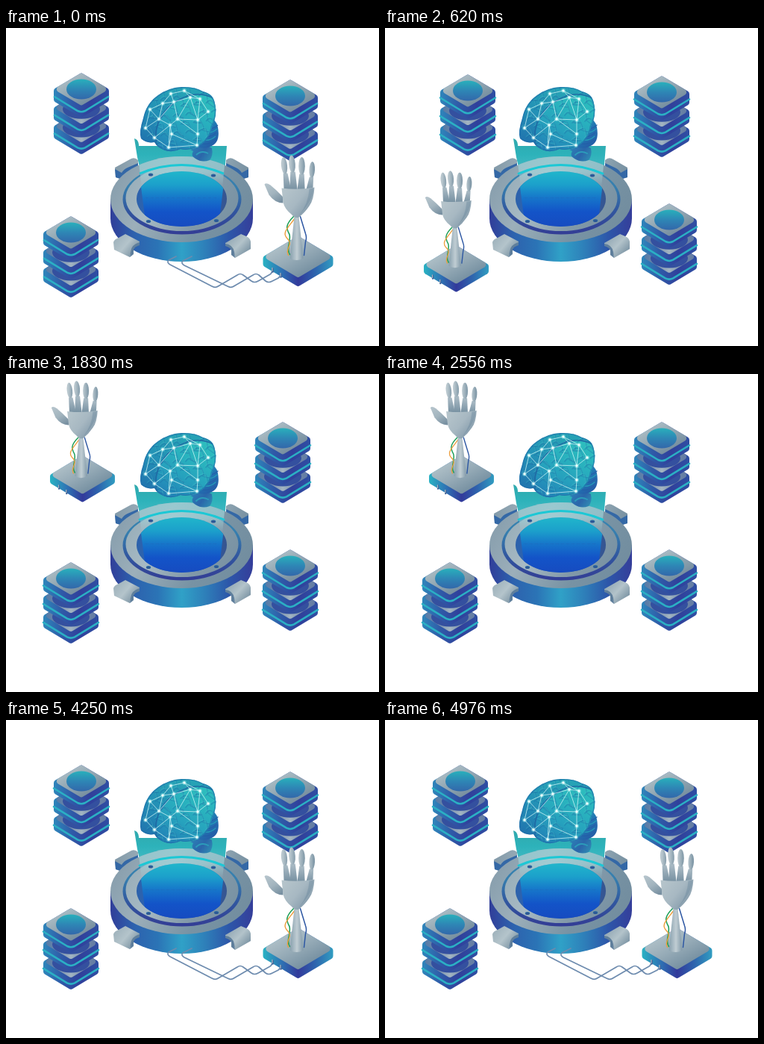
Write an HTML page with a canvas that moves like this. It is 500 by 426 pixels and loops after 5.46 s.

```html
<!DOCTYPE html>
<html lang="en">
<head>
<meta charset="utf-8">
<title>Brain platform</title>
<style>
html, body { margin: 0; width: 100%; height: 100%; overflow: hidden; background: #fff; }
canvas { display: block; width: 500px; height: 426px; }
</style>
</head>
<body>
<canvas id="stage" width="500" height="426"></canvas>
<script>
const ctx = document.getElementById('stage').getContext('2d');
const TAU = Math.PI * 2;

// Each scene: end time, server stacks [x, top], arm [x, bottom, scale]
const LAST = { stacks: [[101, 60], [381, 69], [87, 252]], arm: [391.5, 346.5, 1], cables: true };
const SCENES = [
  { end: 620, ...LAST },
  { end: 1830, stacks: [[111, 62], [371, 64], [381, 235]], arm: [95.5, 354, 0.925] },
  { end: 3040, stacks: [[371, 64], [87, 252], [381, 235]], arm: [102.5, 172, 0.925] },
  { end: 4250, stacks: [[101, 60], [87, 252], [381, 235]], arm: [378.5, 182, 0.925] },
  { end: 5460, ...LAST }
];

function grad(x0, y0, x1, y1, ...colors) {
  const g = ctx.createLinearGradient(x0, y0, x1, y1);
  colors.forEach((c, i) => g.addColorStop(i / (colors.length - 1), c));
  return g;
}

function fillPath(d, style) {
  ctx.fillStyle = style;
  ctx.fill(new Path2D(d));
}

function strokePath(d, style, width = 1) {
  ctx.strokeStyle = style;
  ctx.lineWidth = width;
  ctx.stroke(new Path2D(d));
}

function oval(x, y, rx, ry, style, angle = 0) {
  ctx.beginPath();
  ctx.ellipse(x, y, rx, ry, angle, 0, TAU);
  ctx.fillStyle = style;
  ctx.fill();
}

// Rounded rhombus extruded downwards; depth 0 gives a flat tile
function slab(cx, cy, hw, hh, depth, radius, style) {
  const pts = [[cx, cy - hh], [cx + hw, cy], [cx + hw, cy + depth],
    [cx, cy + hh + depth], [cx - hw, cy + depth], [cx - hw, cy]];
  if (!depth) pts.splice(4, 1), pts.splice(2, 1);
  ctx.beginPath();
  const last = pts[pts.length - 1];
  ctx.moveTo((last[0] + cx) / 2, (last[1] + pts[0][1]) / 2);
  pts.forEach((p, i) => ctx.arcTo(...p, ...pts[(i + 1) % pts.length], radius));
  ctx.closePath();
  ctx.fillStyle = style;
  ctx.fill();
}

function chevron(x, y, hw, hh, style, width) {
  strokePath(`M${x - hw} ${y}L${x - 5} ${y + hh - 2.5}Q${x} ${y + hh} ${x + 5} ${y + hh - 2.5}L${x + hw} ${y}`, style, width);
}

function stack(x, top) {
  for (let i = 2; i >= 0; i--) {
    const y = top + 22 + i * 24.7;
    slab(x, y, 37, 22, 16, 4, grad(x - 37, 0, x + 37, 0, '#2f86bb', '#2f5aa8', '#30409b', '#2f4fa3'));
    chevron(x, y + 9.5, 37, 22, '#2bb0c4', 2.6);
    if (i) {
      slab(x, y, 37, 22, 0, 4, grad(x - 37, y, x + 37, y, '#4f78a8', '#6d86a8', '#a3b5c2', '#7088a6', '#5f78a4'));
      oval(x, y + 2, 25, 13, '#34509f');
    } else {
      slab(x, y, 37, 22, 0, 4, grad(x - 14, y - 22, x + 10, y + 22, '#b0c1c8', '#91a6b2', '#718a9c'));
      oval(x, y, 20, 13.5, grad(x, y - 13, x, y + 13, '#29aebb', '#2e86b5', '#3269ab'));
    }
  }
}

function cables() {
  ctx.lineJoin = ctx.lineCap = 'round';
  const paths = [
    'M228 306L218 311Q215 314 220 317L276 346Q281 349 286 345L310 331Q314 328 318 331L329 339Q333 342 338 339L354 330Q357 328 357 323',
    'M249 306L237 312Q234 315 239 318L297 346Q302 349 307 345L331 331Q335 328 339 331L348 339Q352 342 357 339L365 335Q368 333 368 329'
  ];
  for (const p of paths) strokePath(p, '#6d8bae', 1.7);
}

function finger(tipX, tipY, jointX, jointY, baseX, baseY, w) {
  fillPath(`M${jointX - w + 0.5} ${jointY - 1}H${jointX + w - 0.5}L${baseX + w + 1.5} ${baseY}H${baseX - w - 1.5}Z`,
    grad(0, jointY, 0, baseY, '#a9bac4', '#758fa0'));
  oval((tipX + jointX) / 2, (tipY + jointY) / 2, w + 0.6, (jointY - tipY) / 2 + 0.5,
    grad(jointX - w, 0, jointX + w, 0, '#b9c7ce', '#8199a8'), (tipX - jointX) / 28);
}

// Drawn around the platform's bottom corner
function arm(x, bottom, scale) {
  ctx.save();
  ctx.translate(x, bottom);
  ctx.scale(scale, scale);
  slab(0, -40, 47, 28, 12, 4, grad(-47, 0, 47, 0, '#29b2c3', '#2e76b5', '#323a9b', '#2e65ae', '#319dc1'));
  slab(0, -40, 47, 28, 0, 4, grad(-18, -68, 12, -12, '#b6c6cc', '#96abb7', '#708b9d'));
  for (const [px, py] of [[-34, -24], [-23, -17]]) {
    strokePath(`M${px} ${py + 4}V${py}`, '#3c5f98', 2.6);
    strokePath(`M${px - 0.6} ${py + 3}V${py - 1}`, '#a8bac4', 1.3);
  }

  strokePath('M-6 -94C-17 -83 -16 -78 -12 -71S-17 -51 -11 -43', '#1d9e58', 1.6);
  strokePath('M-4 -92C-15 -77 -22 -72 -14 -64S-18 -51 -13 -42', '#ee9d3b', 1.4);
  strokePath('M3 -94L10 -71Q12 -66 10 -60L8 -42', '#2c56a2', 1.5);
  fillPath('M-5 -94H1L7 -38Q-2 -33 -11 -38Z', grad(-10, 0, 7, 0, '#8da4b1', '#c0cdd3', '#8199a8'));

  finger(-20, -173, -17, -151, -14, -129, 3.4);
  finger(-9, -175.5, -7, -153, -6, -129, 3.7);
  finger(5, -173, 5, -150, 4, -129, 3.7);
  finger(19.5, -167, 18, -146, 15, -128, 3.2);
  fillPath('M-45 -137Q-43 -140 -37 -136L-29 -129L-20 -120V-112Q-31 -112 -39 -123Z',
    grad(-42, -137, -26, -112, '#b4c3cb', '#a2b4be', '#7890a1'));
  fillPath('M-22 -132Q0 -129 22 -133Q21 -116 15 -108Q9 -99 1 -93Q-4 -91 -9 -97Q-18 -104 -20 -113Z',
    grad(-16, -130, 18, -102, '#b4c3ca', '#a7b8c2', '#8299a9'));
  fillPath('M15 -131L21 -132Q20 -116 1 -95Q14 -111 15 -131Z', 'rgba(98,130,153,.35)');
  ctx.restore();
}

function bracket(shape, underside, tone, shade) {
  fillPath(shape, tone);
  fillPath(underside, shade);
}

// Light above the platform, hidden below the disc's far edge
function beamBack() {
  fillPath('M172 148Q177 149 178 156V158H296L293 195H181L176 173Z', grad(0, 148, 0, 190, '#31a9ad', '#2db2ba', '#43bac3'));
}

function platform() {
  const metal = grad(145, 175, 325, 205, '#8299a8', '#b7c6cd', '#758fa0');
  bracket('M146 187L166 176Q172 172 177 177V190L165 195Q157 196 156 203L147 200Z',
    'M146 189L155 194Q158 189 163 187L177 181V186L164 193Q157 196 156 203L147 200Z', metal, '#3468a6');
  bracket('M325 187L306 176Q300 172 295 177V190L306 195Q314 196 315 203L325 200Z',
    'M325 189L316 194Q313 189 308 187L295 181V186L307 193Q314 196 315 203L325 200Z', metal, '#3468a6');
  beamBack();

  ctx.beginPath();
  ctx.ellipse(235.5, 255, 95.5, 58, 0, 0, Math.PI);
  ctx.lineTo(140, 229);
  ctx.lineTo(331, 229);
  ctx.fillStyle = grad(140, 0, 331, 0, '#313e99', '#2d62ae', '#2b74b6', '#30a1c7', '#2e7fb9', '#2d56a9', '#353e9a');
  ctx.fill();

  oval(235.5, 229.5, 95.5, 57.5, grad(140, 175, 330, 285, '#8199a9', '#9cafba', '#7893a4', '#708b9d'));
  oval(236, 229.5, 79.5, 47, grad(0, 182, 0, 276, '#3a86b0', '#367eae', '#31569f', '#333d95'));
  oval(236, 228, 75.5, 44, grad(160, 185, 310, 273, '#94aab6', '#a7bac4', '#8299a9', '#7690a1'));
  oval(235.5, 229, 60.5, 37, grad(175, 0, 296, 0, '#2d62ac', '#2863b9', '#365590'));

  const front = grad(145, 278, 176, 304, '#9bafb9', '#b4c4cb', '#708a9c');
  bracket('M144 287Q145 283 151 281L160 276L179 286V291Q170 290 168 298L166 307L145 297Z',
    'M179 287Q168 290 167 300L166 307L171 303V297Q172 293 179 291Z', front, '#5f7f9c');
  bracket('M328 286Q327 281 322 279L315 276L294 288V292Q304 291 305 299L307 308L328 296Z',
    'M294 289Q304 290 306 300L307 308L302 304V298Q301 294 294 292Z',
    grad(298, 278, 326, 304, '#8ea4b1', '#b3c3ca', '#708a9c'), '#5f7f9c');
}

function beamFront() {
  ctx.save();
  ctx.beginPath();
  ctx.ellipse(235.5, 229.5, 95.5, 57.5, 0, 0, TAU);
  ctx.clip();
  fillPath('M176 165H295L290 214H182Z', grad(0, 172, 0, 214, 'rgba(150,212,217,.7)', 'rgba(160,214,219,.6)', 'rgba(160,206,214,0)'));
  strokePath('M179 195Q235 172 292 195', '#1cc8d5', 2.8);
  ctx.restore();

  ctx.save();
  ctx.beginPath();
  ctx.ellipse(235.5, 229, 60.5, 37, 0, 0, TAU);
  ctx.clip();
  fillPath('M178 190H294L285 267H188Z', grad(0, 192, 0, 264, '#20b6cb', '#1ca0cb', '#1675ca', '#1354c8', '#164cc1'));
  ctx.restore();
  ctx.setLineDash([4, 3]);
  strokePath('M187 227.5H285', 'rgba(35,99,180,.35)', 1);
  ctx.setLineDash([]);

  for (const [x, y] of [[194, 196.5], [278, 197.5], [191, 259], [282, 258]]) {
    oval(x, y, 3.2, 2, '#28679f');
    oval(x, y + 0.5, 2, 1, '#324e91');
  }
}

const BRAIN_NODES = [[193, 109], [210, 101], [221, 88], [239, 84], [225, 99], [247, 93],
  [260, 95], [271, 112], [257, 123], [230, 122], [220, 130], [222, 142], [199, 147],
  [218, 160], [256, 157], [257, 142], [187, 134], [205, 122]];
const BRAIN_LINKS = ['0 1 2 3 5 6 7 8 15 14 13 11 10 9 5', '0 16 12 13', '1 4 5 8 6',
  '1 17 16', '2 4 17 10', '11 14', '9 8', '9 15', '12 10', '0 17', '4 9', '3 6', '13 10'];

function brain() {
  fillPath('M247 163L267 156L276 161Q278 171 273 177Q263 181 254 175Q247 171 251 165Z',
    grad(250, 160, 276, 178, '#2b7fb6', '#2b66aa', '#2f91b5'));
  strokePath('M255 170Q262 163 271 168', '#2c9cba', 2);
  fillPath('M263 124Q281 116 284 133Q287 150 279 156Q266 165 252 157Z',
    grad(260, 128, 285, 158, '#2589b8', '#2270b1', '#2656a3'));
  for (let i = 0; i < 5; i++) {
    strokePath(`M${264 - i} ${134 + i * 5}q11 4 20 -4`, i % 2 ? '#269db8' : '#255fa8', 1.2);
  }

  const body = new Path2D('M181 148Q178 139 184 121Q188 101 204 90Q218 80 235 79Q253 78 264 85Q278 88 280 101Q284 117 276 132Q273 151 258 158Q245 165 234 162Q222 168 211 163Q203 160 199 153Q188 155 181 148Z');
  ctx.save();
  ctx.clip(body);
  ctx.fillStyle = grad(225, 80, 190, 155, '#26a2b5', '#2390b6', '#2174ae');
  ctx.fillRect(175, 75, 112, 95);
  fillPath('M202 157Q198 137 207 121Q216 104 231 97Q253 83 274 93Q286 103 280 119Q274 150 257 159Q228 166 212 164Z',
    grad(262, 88, 222, 164, '#2dbdbd', '#29b2be', '#26a0bd', '#2283b7'));
  // Repeating winding folds, soft groove with a light lip
  for (let row = 0; row < 7; row++) {
    for (let col = 0; col < 6; col++) {
      const x = 183 + col * 17 + row % 2 * 7, y = 87 + row * 12 - col * 2;
      const bend = 5 + (row * 3 + col * 5) % 6;
      const fold = `q${bend} -8 11 0t2 9t8 ${bend - 4}`;
      strokePath(`M${x} ${y}${fold}`, 'rgba(27,108,165,.34)', 1.8);
      strokePath(`M${x - 1} ${y - 1.5}${fold}`, 'rgba(84,212,210,.3)', 1);
    }
  }
  strokePath('M202 157Q198 137 207 121Q216 104 231 97Q253 83 276 93', 'rgba(30,100,162,.8)', 1.8);
  ctx.lineWidth = 3;
  ctx.strokeStyle = 'rgba(32,108,170,.55)';
  ctx.stroke(body);
  ctx.restore();

  for (const link of BRAIN_LINKS) {
    strokePath('M' + link.split(' ').map(i => BRAIN_NODES[i].join(' ')).join('L'), 'rgba(216,250,248,.8)', 0.9);
  }
  for (const [x, y] of BRAIN_NODES) {
    oval(x, y, 3, 3, 'rgba(160,242,238,.4)');
    oval(x, y, 1.7, 1.7, '#f1fffe');
  }
}

function draw(scene) {
  ctx.fillStyle = '#fff';
  ctx.fillRect(0, 0, 500, 426);
  scene.stacks.forEach(s => stack(...s));
  platform();
  beamFront();
  brain();
  if (scene.cables) cables();
  arm(...scene.arm);
}

const start = performance.now();
let shown;
function tick() {
  const t = (performance.now() - start) % 5460;
  const scene = SCENES.find(s => t < s.end);
  if (scene !== shown) draw(shown = scene);
  requestAnimationFrame(tick);
}
tick();
</script>
</body>
</html>
```
